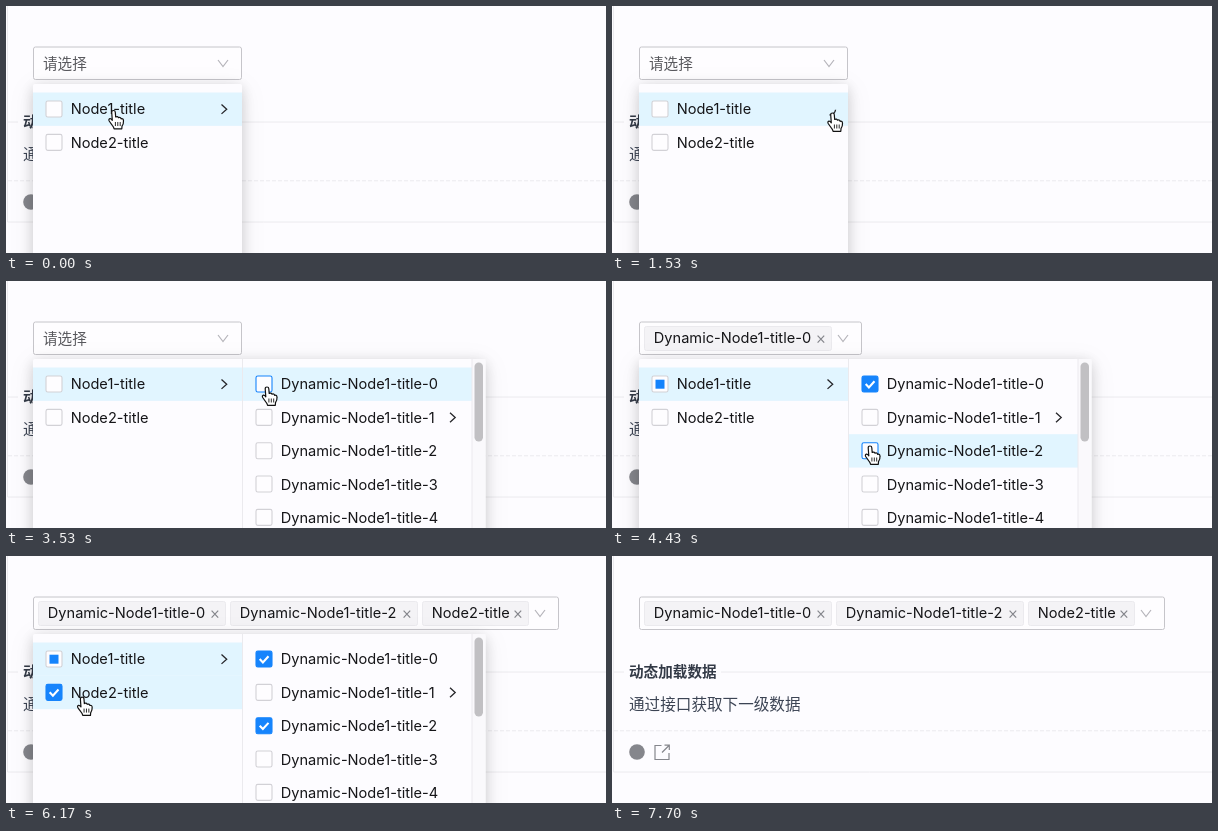
An HTML page for the animation above (7.81 s loop, 600 px wide and 247 px high).

```html
<!DOCTYPE html>
<html lang="zh">
<head>
<meta charset="utf-8">
<style>
  html, body { margin: 0; width: 100%; height: 100%; overflow: hidden; background: #fdfcff; }
  svg { display: block; width: 600px; height: 247px; }
  text { font: 14.6px Inter, "Noto Sans CJK SC", "Noto Sans CJK", sans-serif; fill: #151518; white-space: pre; }
  .line { fill: none; stroke: #ebeaee; }
  .icon { fill: none; stroke: #85868c; stroke-width: 1.2; }
  .arrow { fill: none; stroke: #26262a; stroke-width: 1.3; }
  .box { fill: #fefdff; stroke: #d2d1d6; stroke-width: 1.1; }
  .tick { fill: none; stroke: #fff; stroke-width: 2.1; }
  .panel { fill: #fdfcff; filter: drop-shadow(0 3px 7px rgba(0,0,0,.16)) drop-shadow(0 5px 12px rgba(0,0,0,.07)); }
  .row { fill: #e1f5ff; }
</style>
</head>
<body>
<svg viewBox="0 0 600 247" id="stage"></svg>
<script>
const LOOP = 7810;
const TIME = { load: 1265, open: 2285, first: 3640, second: 4520, third: 6000, close: 6850, gone: 7090, leave: 7700 };
const BLUE = '#1684fc';
const TOP = 86.5, PITCH = 33.35;

// pointer tip: time, x, y
const PATH = [
  [0, 107.5, 104.5], [230, 107.5, 104.5], [1000, 213, 106], [1180, 229, 110],
  [1370, 220.5, 107], [2700, 220.5, 107], [3420, 261, 106], [3800, 261, 106],
  [4270, 258, 165], [4640, 258, 165], [5080, 60, 149], [5270, 54, 145],
  [5850, 50, 141], [6090, 50, 141], [6670, 543, 143], [6860, 543, 143],
  [7450, 583, 169], [LOOP, 583, 169]
];

const stage = document.getElementById('stage');
const $ = id => document.getElementById(id);
const show = (id, on) => $(id).setAttribute('display', on ? 'inline' : 'none');
const label = (x, y, s, extra = '') => `<text x="${x}" y="${y}" ${extra}>${s}</text>`;
const rowY = i => TOP + PITCH * i;

const items = [];
function row(col, i, name, chevron) {
  const id = `c${col}r${i}`, y = rowY(i), mid = y + PITCH / 2;
  const x = col ? 237 : 27, w = col ? 229 : 209, bx = x + 13;
  items.push({ id, x, y, w, bx, by: mid - 8.2 });
  const ax = col ? 444 : 215.5;
  return `<rect id="${id}" class="row" x="${x}" y="${y}" width="${w}" height="${PITCH}"/>
    <rect id="${id}b" class="box" x="${bx}" y="${mid - 8.2}" width="16" height="16" rx="1.8"/>
    <path id="${id}t" class="tick" d="M${bx + 3.7} ${mid - .2}l3.2 3.4l5.6-6.2"/>
    ${label(x + 37.7, mid + 5.3, name)}
    ${chevron ? `<path id="${id}a" class="arrow" d="M${ax} ${mid - 4.7}l5.2 4.7l-5.2 4.7"/>` : ''}`;
}

function tag(id, x, w, name) {
  return `<g id="${id}"><rect x="${x + .5}" y="45.5" width="${w}" height="24" rx="2" fill="#f4f3f6" stroke="#ebeaee"/>
    ${label(x + 9.8, 62.4, name)}
    <path class="icon" d="M${x + w - 13.4} 54.6l6.6 7m0-7l-6.6 7"/></g>`;
}

stage.innerHTML = `
  <rect width="600" height="247" fill="#fdfcff"/>
  <path class="line" d="M1.5 0V216H600M1.5 116H12M109 116H600"/>
  <path class="line" stroke-dasharray="4 2" d="M2 174.8H600"/>
  ${label(17, 121.2, '动态加载数据', 'style="font-weight:600;fill:#333a47"')}
  ${label(17, 153.6, '通过接口获取下一级数据', 'style="font-size:15.6px;fill:#3c4454"')}
  <circle cx="25" cy="196" r="7.8" fill="#85868c"/>
  <path class="icon" d="M49.5 189.5H43V203.5H57V197M50 196.500L57 189.500M52.500 189.200H57.300V194"/>
  <rect id="field" x="27.5" y="41" width="208" height="32.500" rx="2" fill="#fefdff" stroke="#c6c5ca"/>
  ${label(37, 62.600, '请选择', 'id="hint" style="fill:#58585d"')}
  ${tag('tag1', 32, 187, 'Dynamic-Node1-title-0')}
  ${tag('tag2', 224, 187, 'Dynamic-Node1-title-2')}
  ${tag('tag3', 416, 106, 'Node2-title')}
  <path id="caret" class="icon" style="stroke:#b5b4ba" d="M-5 54l5 6.500l5-6.500"/>
  <g id="popup">
    <rect id="panel" class="panel" x="27" y="78" width="209" height="196" rx="2"/>
    ${row(0, 0, 'Node1-title', true)}
    ${row(0, 1, 'Node2-title')}
    <rect id="partial" x="43.500" y="98.700" width="9" height="9" fill="${BLUE}"/>
    <path id="spin" class="arrow" d="M0-5.600A5.600 5.600 0 0 1 5.600 0"/>
    <g id="column">
      <path class="line" d="M236.500 78V247"/>
      ${[0, 1, 2, 3, 4].map(i => row(1, i, 'Dynamic-Node1-title-' + i, i === 1)).join('')}
      <rect x="466" y="78" width="13.500" height="180" fill="#faf9fc"/>
      <path class="line" d="M466 78V247"/>
      <rect x="468.500" y="81.500" width="8.500" height="79" rx="4.200" fill="#c1c0c3"/>
    </g>
  </g>
  <g id="pointer" stroke-linejoin="round">
    <g id="hand">
      <path fill="#fff" stroke="#111" stroke-width="1.200" d="M-1.800 1.800Q-1.800 0 0 0T1.800 1.800L2.200 6.500Q4.200 5.300 5 7.200Q6.900 6.300 7.600 8.300Q10 7.700 10 10.400Q10.200 13.200 8.500 15.700L8.300 18.300H.6Q.3 16.600-1 15.100Q-2.700 12.900-4.300 10.500Q-5.200 8.600-3.600 8.200Q-2.500 8-1.200 9.800Z"/>
      <path fill="none" stroke="#111" stroke-width=".9" d="M1.900 11.500v4M4.300 11.500v4M6.700 11.500v4"/>
    </g>
    <path id="plain" fill="#111" stroke="#fff" stroke-width=".9" d="M0 0V15.300L3.500 12L6 17.700L8.700 16.500L6.200 11H11Z"/>
  </g>`;

function pointerAt(t) {
  let i = 1;
  while (PATH[i][0] < t) i++;
  const [t0, x0, y0] = PATH[i - 1], [t1, x1, y1] = PATH[i];
  const u = (t - t0) / (t1 - t0), e = u * u * (3 - 2 * u);
  return [x0 + (x1 - x0) * e, y0 + (y1 - y0) * e];
}

function draw(t) {
  const [x, y] = pointerAt(t);
  const opened = t >= TIME.open, alive = t < TIME.close;
  const checked = { c1r0: t >= TIME.first, c1r2: t >= TIME.second, c0r1: t >= TIME.third };
  const loading = t >= TIME.load && !opened;

  for (const it of items) {
    const { id } = it;
    const reachable = alive && (opened || it.x < 100);
    const over = reachable && x >= it.x && x < it.x + it.w && y >= it.y && y < it.y + PITCH;
    const onBox = over && x >= it.bx && x < it.bx + 17 && y >= it.by && y < it.by + 17;
    show(id, over || (id === 'c0r0' && t >= TIME.load));
    show(id + 't', checked[id]);
    $(id + 'b').style.fill = checked[id] ? BLUE : '';
    $(id + 'b').style.stroke = checked[id] || onBox ? BLUE : '';
  }

  const count = (t >= TIME.first) + (t >= TIME.second) + (t >= TIME.third);
  const right = [236, 250, 442, 553][count];
  $('field').setAttribute('width', right - 28);
  $('caret').setAttribute('transform', `translate(${right - 19} 0)`);
  show('hint', !count);
  for (let i = 1; i <= 3; i++) show('tag' + i, count >= i);

  show('partial', count > 0);
  show('column', opened);
  show('c0r0a', !loading);
  show('spin', loading);
  $('spin').setAttribute('transform', `translate(218 103.200) rotate(${(t - TIME.load) * .36})`);
  $('panel').setAttribute('width', opened ? 452.5 : 209);

  const out = Math.min(1, Math.max(0, (t - TIME.close) / (TIME.gone - TIME.close)));
  const fade = out ** 3;
  show('popup', out < 1);
  $('popup').setAttribute('opacity', 1 - fade);
  $('popup').setAttribute('transform', `translate(0 78) scale(1 ${1 - .2 * fade}) translate(0 -78)`);

  const inside = alive && x > 27 && x < (opened ? 479 : 236) && y > 78;
  show('hand', inside);
  show('plain', !inside);
  show('pointer', t < TIME.leave);
  $('pointer').setAttribute('transform', `translate(${x} ${y})`);
}

const start = performance.now();
function tick() {
  draw((performance.now() - start) % LOOP);
  requestAnimationFrame(tick);
}
draw(0);
requestAnimationFrame(tick);
</script>
</body>
</html>
```
